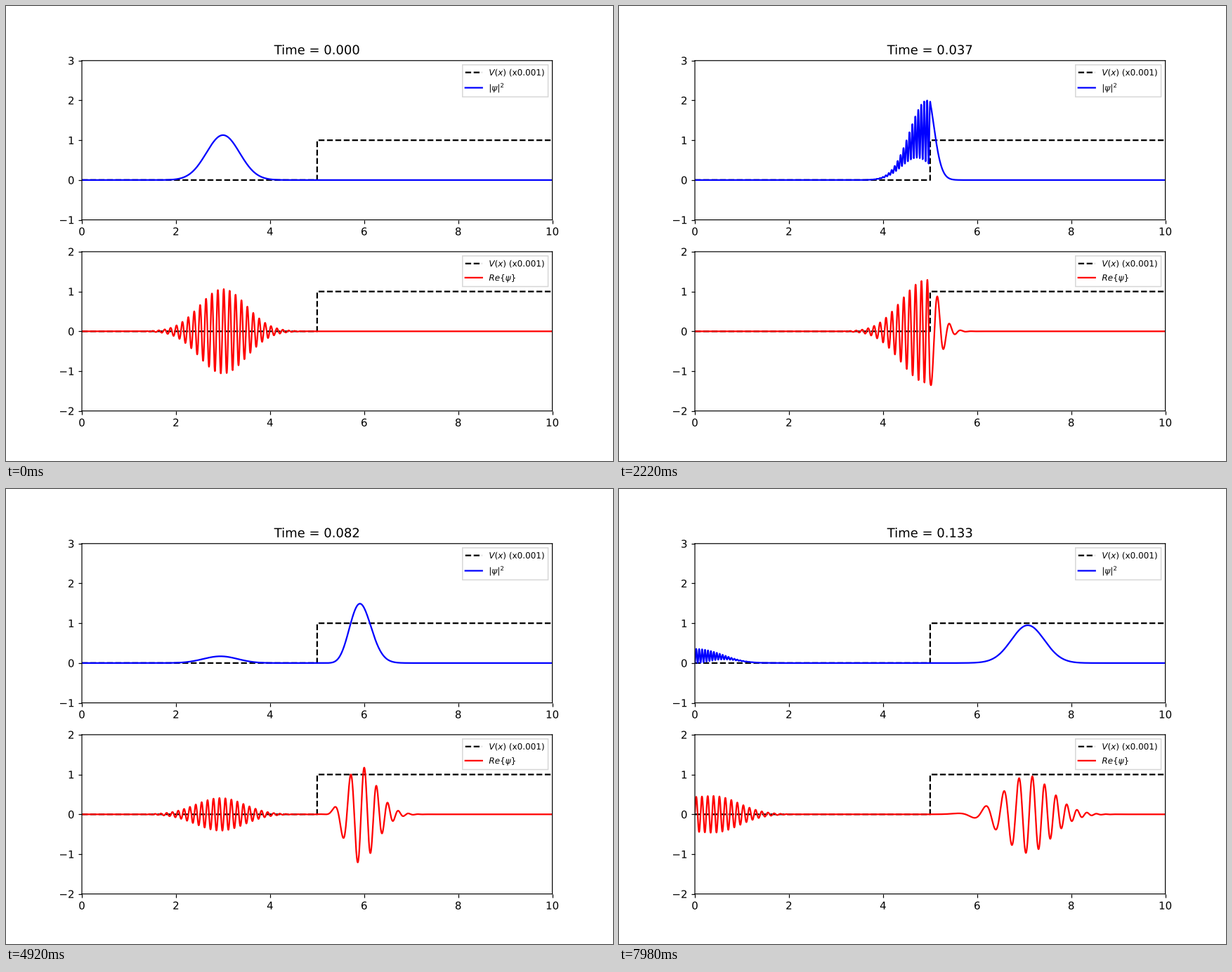
These frames come from a looping animation (864 by 648 pixels, 8 s). A matplotlib script:

```python
import numpy as np
import matplotlib.pyplot as plt
from matplotlib.animation import FuncAnimation
from matplotlib.patheffects import Normal

# Unsnapped lines and outline text give smooth subpixel placement.
plt.rcParams.update({
    "path.snap": False,
    "text.hinting": "none",
    "path.effects": [Normal()],
})

# Wave packet hitting a potential step (hbar = m = 1)
DX = 0.002
N = 5000
X = DX * np.arange(N)
V = np.where(np.arange(N) > N // 2, 1000.0, 0.0)
X0, SIGMA, K0 = 3.0, 0.5, 50
MODES = 800

STATES = 134      # one state per 0.001 time units, each shown for 60 ms
DT = 0.001
FRAMES, INTERVAL = 200, 40


def evolve():
    """Solve on the grid, using the lowest sine modes of the box."""
    m = np.arange(1, MODES + 1)
    angle = np.pi * m / (N + 1)
    modes = np.sqrt(2 / (N + 1)) * np.sin(np.outer(np.arange(1, N + 1), angle))
    kinetic = (1 - np.cos(angle)) / DX**2
    energy, vecs = np.linalg.eigh(np.diag(kinetic) + modes.T @ (V[:, None] * modes))

    amp = 1 / np.sqrt(SIGMA * np.sqrt(np.pi))
    psi0 = amp * np.exp(-(X - X0)**2 / (2 * SIGMA**2) + 1j * K0 * X)
    coef = vecs.T @ (modes.T @ psi0)
    t = DT * np.arange(STATES)
    return (modes @ (vecs @ (coef[:, None] * np.exp(-1j * np.outer(energy, t))))).T


def panel(pos, ylim, yticks, color, label):
    ax = fig.add_subplot(2, 1, pos)
    ax.set_xlim(0, 10)
    ax.set_ylim(*ylim)
    ax.set_yticks(yticks)
    ax.plot(X, V * 0.001, "k--", label=r"$V(x)$ (x0.001)")
    line, = ax.plot([], [], color=color, label=label)
    ax.legend(loc="upper right", fontsize=8, fancybox=False,
              borderpad=0.33, labelspacing=0.45)
    return ax, line


states = evolve()

fig = plt.figure(figsize=(8, 6), dpi=108)
top, density = panel(1, (-1, 3), range(-1, 4), "b", r"$|\psi|^2$")
_, real = panel(2, (-2, 2), range(-2, 3), "r", r"$Re\{\psi\}$")
title = top.set_title("Time = 0.000")


def update(frame):
    i = min((2 * frame + 1) // 3, STATES - 1)
    psi = states[i]
    density.set_data(X, np.abs(psi)**2)
    real.set_data(X, psi.real)
    title.set_text(f"Time = {i * DT:.3f}")
    return density, real, title


anim = FuncAnimation(fig, update, frames=FRAMES, interval=INTERVAL,
                     init_func=lambda: update(0), repeat=True, repeat_delay=0)
plt.show()
```
